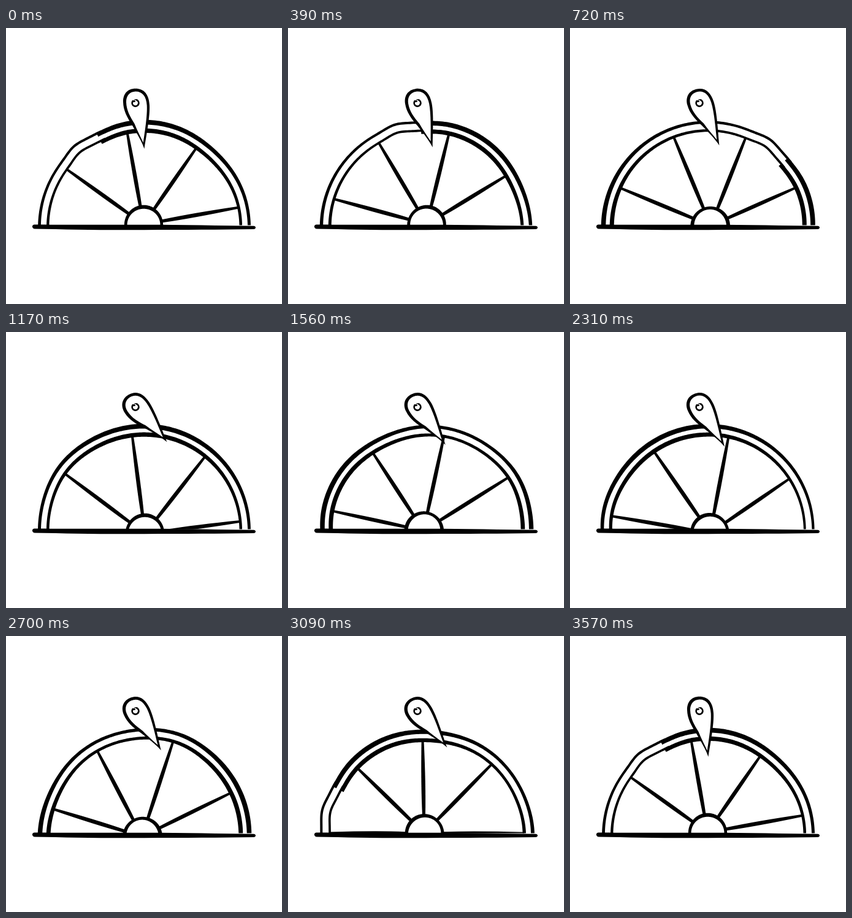
Write an HTML page with a canvas that moves like this. It is 450 by 450 pixels and loops after 4.5 s.

```html
<!DOCTYPE html>
<html lang="en">
<head>
<meta charset="utf-8">
<title>Spinning wheel</title>
<style>
  html, body { margin: 0; width: 100%; height: 100%; overflow: hidden; background: #fff; }
  canvas { display: block; width: 450px; height: 450px; }
</style>
</head>
<body>
<canvas id="stage" width="450" height="450"></canvas>
<script>
const ctx = document.getElementById('stage').getContext('2d');
const LOOP = 4500, SPIN = 3570, STEP = 30, TURNS = 2;
const AXLE = [225.5, 324.5], HUB = [-1, -3.5], PIVOT = [212, 121.5], GROUND = 321.5;
const JOINT = 117, RIM_GAP = 13.7;

// Pointer swing: time, degrees
const SWING = [[0, 0], [720, 14], [1170, 31], [1920, 20.5], [2700, 22], [3090, 28], [3570, 0]];

const rad = d => d * Math.PI / 180;
const cos = d => Math.cos(rad(d));
const smooth = x => x * x * (3 - 2 * x);
const clamp = x => Math.max(0, Math.min(1, x));
const bump = (d, at, spread) => Math.exp(-(((d - at) / spread) ** 2));
const polar = (d, r) => [r * Math.cos(rad(d)), -r * Math.sin(rad(d))];

function polygon(points) {
  const p = new Path2D();
  points.forEach(([x, y]) => p.lineTo(x, y));
  p.closePath();
  return p;
}

// Closed brush line around the axle, with radius and width given by angle
function brush(from, to, radius, width) {
  const outer = [], inner = [];
  for (let d = from; d <= to; d++) {
    outer.push(polar(d, radius(d) + width(d) / 2));
    inner.unshift(polar(d, radius(d) - width(d) / 2));
  }
  return polygon([...outer, ...inner]);
}

// The rim is one stroke that starts thin and ends thick, overlapping at the joint
const rimRadius = d => 171 + 3.5 * bump(d, 131, 7) + 2.5 * bump(d, 324, 18)
  - 3 * bump(d, 408, 22) - 2 * bump(d, JOINT + 360, 12);
const rimWidth = d => {
  const full = 6.4 - 1.4 * cos(2 * d);
  return 4 + (full - 4) * smooth(clamp((d - 145) / 50));
};
const rimLine = (inset, scale) =>
  brush(JOINT - 3, JOINT + 360, d => rimRadius(d) - inset, d => rimWidth(d) * scale);

function spoke(i) {
  const d = 45 * i + 9.4 + 2.5 * cos(45 * i - 20);
  const [hx, hy] = polar(d, 31);
  const [x0, y0] = [HUB[0] + hx, HUB[1] + hy];
  const [x1, y1] = polar(d, rimRadius(d < JOINT ? d + 360 : d) - RIM_GAP);
  const len = Math.hypot(x1 - x0, y1 - y0);
  const nx = (y0 - y1) / len, ny = (x1 - x0) / len;
  const at = (s, h) => [x0 + (x1 - x0) * s + nx * h, y0 + (y1 - y0) * s + ny * h];
  const p = new Path2D();
  p.moveTo(...at(0, 2.5));
  p.quadraticCurveTo(...at(.4, 4.2), ...at(1, 1.9));
  p.lineTo(...at(1, -1.9));
  p.quadraticCurveTo(...at(.4, -4.2), ...at(0, -2.5));
  return p;
}

const hub = new Path2D();
hub.addPath(brush(0, 360, () => 29.3, d => 5.4 - .7 * cos(2 * d)), new DOMMatrix().translate(...HUB));

const wheel = [rimLine(0, 1), rimLine(RIM_GAP, .92), hub];
for (let i = 0; i < 8; i++) wheel.push(spoke(i));

const drop = new Path2D('M225.5 197C222 186 213 171 206 159C197 145 191.3 134 191 121C190.5 107 199 98.8 211 98.8C225 98.8 233 108 234 126C235 144 229 174 225.5 197Z');
const dropFill = new Path2D('M223.8 187C219 177 213.5 166 209.5 156C202 144 196.4 134 196 121C195.8 110 202 103.8 211 103.5C222 103.3 228.7 111 229.7 126C230.7 143 226 171 223.8 187Z');
const ground = new Path2D('M46 320.4C90 320.8 150 320.6 225 320.8C290 321 350 322.2 404 322.7C408 323 408 327.5 404 328C350 329 290 328.8 225 329.2C160 329.8 100 328.4 47 327.5C42 327 41.5 321 46 320.4Z');

function swingAt(t) {
  const i = SWING.findIndex(k => k[0] > t);
  if (i < 0) return 0;
  const [t0, a0] = SWING[i - 1], [t1, a1] = SWING[i];
  return a0 + (a1 - a0) * smooth((t - t0) / (t1 - t0));
}

function drawEye() {
  ctx.lineCap = ctx.lineJoin = 'round';
  ctx.lineWidth = 2.8;
  ctx.beginPath();
  ctx.arc(211, 122.3, 5.3, rad(-65), rad(215));
  ctx.lineTo(209.6, 119.4);
  ctx.stroke();
  ctx.lineWidth = 1.4;
  ctx.beginPath();
  ctx.arc(211, 122.3, 5.7, rad(-100), rad(-60));
  ctx.stroke();
}

function draw(t) {
  ctx.fillStyle = '#fff';
  ctx.fillRect(0, 0, 450, 450);
  ctx.fillStyle = ctx.strokeStyle = '#000';

  ctx.save();
  ctx.beginPath();
  ctx.rect(0, 0, 450, GROUND);
  ctx.clip();
  ctx.translate(...AXLE);
  ctx.rotate(rad(360 * TURNS * smooth(clamp(t / SPIN))));
  wheel.forEach(p => ctx.fill(p));
  ctx.restore();

  ctx.fill(ground);

  ctx.save();
  ctx.translate(...PIVOT);
  ctx.rotate(-rad(swingAt(t)));
  ctx.translate(-PIVOT[0], -PIVOT[1]);
  ctx.fill(drop);
  ctx.fillStyle = '#fff';
  ctx.fill(dropFill);
  ctx.restore();

  drawEye();
}

const start = performance.now();
function tick() {
  const t = (performance.now() - start) % LOOP;
  draw(Math.floor(t / STEP) * STEP);
  requestAnimationFrame(tick);
}
tick();
</script>
</body>
</html>
```
